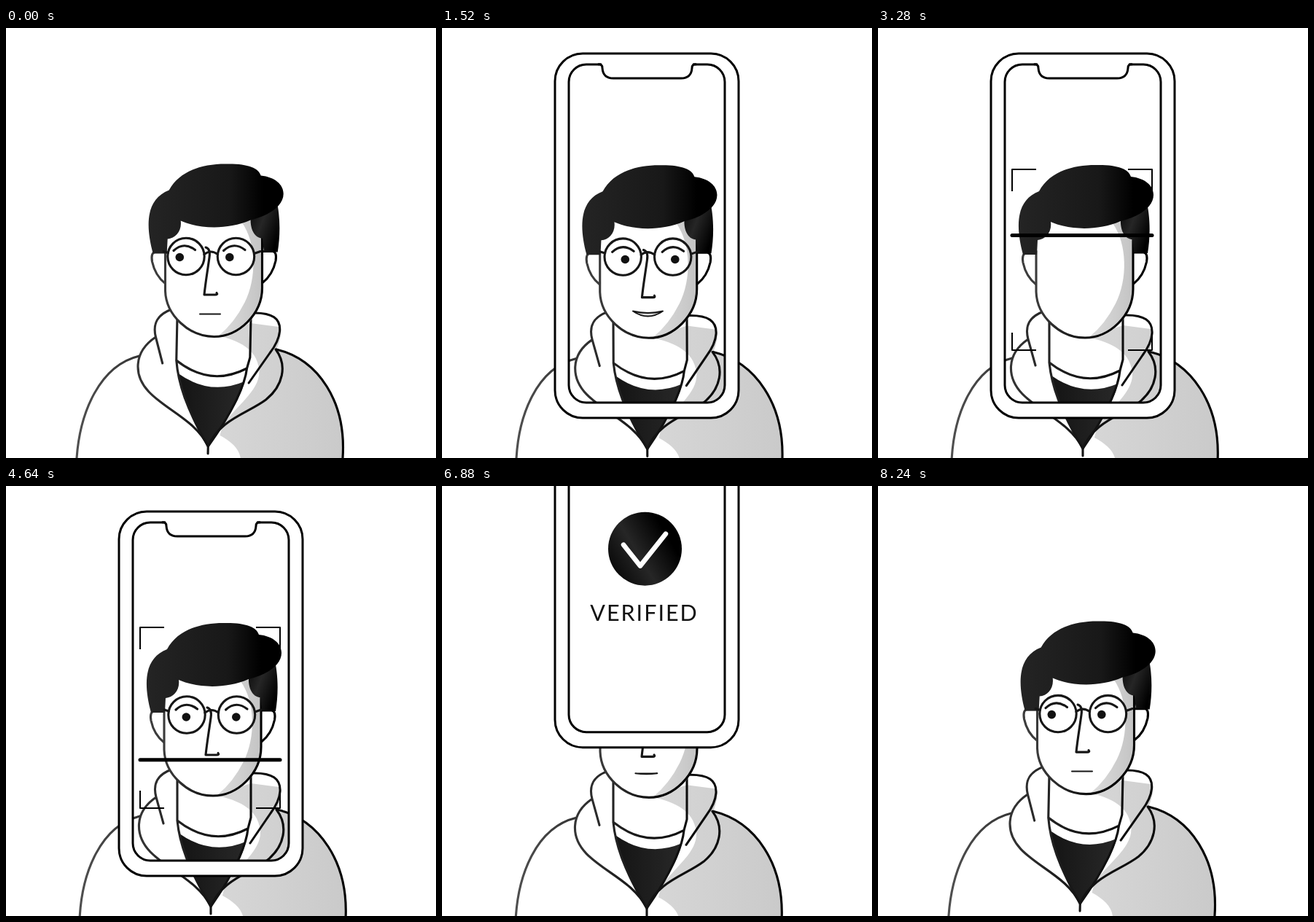
Animation, 590 px wide and 590 px high, one loop 8.32 s. Source, as an HTML page:

```html
<!DOCTYPE html>
<html lang="en">
<head>
<meta charset="utf-8">
<title>Face verification</title>
<style>
  html, body { margin: 0; width: 100%; height: 100%; overflow: hidden; background: #fff; }
  svg { display: block; width: 100vw; height: 100vh; }
  .ink { fill: none; stroke-width: 3.1; stroke-linecap: round; stroke-linejoin: round; }
  .label { font: 30.5px Lato, "Open Sans", sans-serif; letter-spacing: 2px; text-anchor: middle; fill: #111; }
</style>
</head>
<body>
<svg viewBox="0 0 590 590">
  <defs>
    <linearGradient id="bodyInk" gradientUnits="userSpaceOnUse" x1="100" x2="460">
      <stop stop-color="#505050"/><stop offset=".5" stop-color="#141414"/><stop offset="1"/>
    </linearGradient>
    <linearGradient id="headInk" gradientUnits="userSpaceOnUse" x1="196" x2="310">
      <stop stop-color="#484848"/><stop offset="1"/>
    </linearGradient>
    <linearGradient id="cloth" gradientUnits="userSpaceOnUse" x1="300" x2="466">
      <stop stop-color="#d6d6d6"/><stop offset="1" stop-color="#cacaca"/>
    </linearGradient>
    <linearGradient id="skin">
      <stop stop-color="#dcdcdc"/><stop offset="1" stop-color="#c4c4c4"/>
    </linearGradient>
    <linearGradient id="shirt">
      <stop stop-color="#141414"/><stop offset="1" stop-color="#282828"/>
    </linearGradient>
    <linearGradient id="hair">
      <stop stop-color="#242424"/><stop offset=".6" stop-color="#181818"/><stop offset=".85"/>
    </linearGradient>
    <linearGradient id="sideHair" x2="1" y2=".6">
      <stop stop-color="#0a0a0a"/><stop offset=".45" stop-color="#262626"/><stop offset="1"/>
    </linearGradient>
    <linearGradient id="badge" y1=".8" x2="1" y2=".2">
      <stop stop-color="#060606"/><stop offset=".4" stop-color="#262626"/><stop offset=".8"/>
    </linearGradient>
    <clipPath id="wipe"><rect id="wipeBox" width="590" height="590"/></clipPath>
  </defs>

  <g id="body">
    <path fill="url(#cloth)" d="M288 424C310 430 346 438 349 474C350 500 322 518 300 548L297 562C312 570 324 580 326 594H466C470 516 430 458 372 444C378 430 380 412 374 413L336 408Z"/>
    <path fill="url(#shirt)" d="M238 477Q282 508 329 488C325 508 310 536 281 577C256 535 243 504 238 477Z"/>
    <g class="ink" stroke="url(#bodyInk)">
      <path d="M101 594C104 530 130 466 184 453M372 444C430 458 470 516 466 594"/>
      <path d="M227 389C208 396 201 408 206 427L216 463M206 427C175 448 177 480 198 502C222 527 264 542 281 577V587"/>
      <path d="M337 394C366 393 377 402 376 419C375 432 369 441 363 449L335 490M371 444C388 466 382 494 359 513C334 532 296 540 281 577"/>
      <path d="M235 396V459C238 490 250 525 281 577M336 394V455L332 470C330 492 314 530 281 577M235 459Q282 496 332 470"/>
    </g>
  </g>

  <g id="face">
    <path id="ear" class="ink" style="color:#3c3c3c" stroke="currentColor" d="M217 309H203Q197 310 199 322C202 336 208 345 217 352"/>
    <path class="ink" stroke="#000" transform="translate(567.500 -1) scale(-1 1)" d="M217 309H203Q197 310 199 322C202 336 208 345 217 352"/>
    <path fill="#fff" d="M217 260V362C218 396 250 425 284 425C318 425 350 394 350 358V260Z"/>
    <path fill="url(#skin)" d="M322 268C342 296 343 345 326 378Q312 406 290 424C322 424 350 396 350 358V262Z"/>
    <path class="ink" stroke="url(#headInk)" d="M217 306V362C218 396 250 425 284 425C318 425 350 394 350 358V290"/>
  </g>

  <g id="hairGroup">
    <path fill="url(#sideHair)" d="M333 262C332 280 340 290 349 290L351 308L370 309C373 290 374 268 370 245Z"/>
    <path fill="url(#hair)" d="M199 311C188 270 190 236 221 224C236 196 270 187 303 188C330 188 344 194 347 204C366 206 378 216 378 229C378 247 355 260 333 265C300 279 262 277 237 266C239 280 230 290 219 291L218 311Z"/>
  </g>

  <g clip-path="url(#wipe)">
    <g class="ink" stroke="#161616">
      <g id="glasses"><path d="M273 311Q282 304 291.500 311M217 307L223.500 309M341.500 310L350 307"/></g>
      <g id="brows"></g>
      <path id="nose" d="M276 304Q283 306 281 318C278 340 276 350 274 369H289Q293 369 291 366.500"/>
      <path id="mouth" fill="#ddd" stroke-width="2"/>
    </g>
    <g id="eyes" fill="#111"></g>
  </g>

  <g id="corners" class="ink" stroke="#000" style="stroke-width:2;stroke-linecap:butt"></g>
  <path id="scan" d="M184 0H376" stroke="#000" stroke-width="5" stroke-linecap="round"/>

  <g id="phone">
    <path id="screen" fill="#fff" d="M174 50H388V514H174Z"/>
    <path id="bezel" fill="#fff" fill-rule="evenodd" stroke="#000" stroke-width="3"/>
    <path stroke="#fff" stroke-width="5" d="M219 50H344"/>
    <path fill="#fff" stroke="#000" stroke-width="3" d="M214 50Q220 49 220 55Q221 69 235 69H328Q342 69 343 55Q343 49 349 50"/>
    <g id="badgeGroup">
      <circle cx="278.500" cy="262.500" r="50.500" fill="url(#badge)"/>
      <path id="check" class="ink" style="stroke-width:6.5" d="M249 257L272 286L307 242" pathLength="100" stroke="#fff"/>
    </g>
    <text id="label" class="label" x="277.500" y="361">VERIFIED</text>
  </g>
</svg>

<script>
const LOOP = 8320, STEP = 80;
const el = Object.fromEntries([...document.querySelectorAll('[id]')].map(e => [e.id, e]));

function add(parent, tag, attrs) {
  const e = document.createElementNS('http://www.w3.org/2000/svg', tag);
  for (const name in attrs) e.setAttribute(name, attrs[name]);
  return parent.appendChild(e);
}

const roundRect = (x, y, w, h, r) => {
  const arc = (dx, dy) => `a${r} ${r} 0 0 1 ${dx} ${dy}`;
  return `M${x + r} ${y}h${w - 2 * r}${arc(r, r)}v${h - 2 * r}${arc(-r, r)}` +
    `h${2 * r - w}${arc(-r, -r)}v${2 * r - h}${arc(r, -r)}z`;
};
el.bezel.setAttribute('d', roundRect(155, 35, 252, 500, 38) + roundRect(174, 50, 214, 464, 24));

const eyes = [248, 316.5].map(x => {
  add(el.glasses, 'circle', { cx: x, cy: 314, r: 25.2 });
  add(el.brows, 'path', { d: `M${x - 15} 307q14 -13 29.500 -1` });
  return add(el.eyes, 'ellipse', { cx: x - .7, cy: 317, rx: 5.8 });
});

for (const sx of [-1, 1]) for (const sy of [-1, 1]) {
  const arm = sy < 0 ? 30 : 24;
  add(el.corners, 'path', { d: `M${280 + 96 * sx} ${318 + (124 - arm) * sy}v${arm * sy}h${-33 * sx}` });
}

const mix = (a, b, p) => a + (b - a) * p;
const move = (e, x, y) => e.setAttribute('transform', `translate(${x} ${y})`);

function drawMouth(smile) {
  const x1 = mix(266, 262, smile), x2 = mix(294, 303, smile);
  const y = mix(392.5, 388.5, smile), mid = (x1 + x2) / 2;
  el.mouth.setAttribute('d',
    `M${x1} ${y}Q${mid} ${y + 14 * smile} ${x2} ${y}Q${mid} ${y + 5 * smile} ${x1} ${y}`);
}

function draw(t) {
  const part = (a, b) => Math.min(1, Math.max(0, (t - a) / (b - a)));
  const ramp = (a, b) => (1 - Math.cos(Math.PI * part(a, b))) / 2;
  const bump = (a, b) => Math.sin(Math.PI * part(a, b));

  // The person faces the viewer, dips as the phone leaves, then looks away.
  const attend = ramp(440, 1240) - ramp(7680, 8200);
  const glance = bump(900, 2160);
  const look = 1 - attend - .2 * glance;
  const bob = 8 * (ramp(6720, 7160) - ramp(7600, 8160)) + bump(0, 480) - 1.3 * bump(8000, 8320);

  // The torso leans from the neck; head parts shift by depth.
  const lean = -.021 * look;
  el.body.setAttribute('transform', `matrix(1 0 ${lean} 1 ${-400 * lean} ${bob - 3 * look})`);
  const shift = (e, x, y) => move(e, x * look, y * look + bob);
  shift(el.face, 1.5, -1.5);
  shift(el.hairGroup, 2.7, -1.5);
  shift(el.glasses, -1, -.5);
  shift(el.brows, -3, -1.5);
  shift(el.nose, -2, -3);
  shift(el.mouth, 0, 0);
  move(el.eyes, 4 * glance - 9 * (1 - attend), bob - 2.5 * look);
  const open = 1 - ramp(7040, 7200) + ramp(7520, 7760);
  for (const eye of eyes) eye.setAttribute('ry', mix(1.3, 5.8, open));
  drawMouth(ramp(480, 1280) - .85 * ramp(6400, 6720) - .15 * ramp(7680, 8080));

  // The beam rises and wipes the features out, then falls and brings them back.
  const beam = mix(453, 233, ramp(2520, 3640) - ramp(3960, 5100));
  el.wipeBox.setAttribute('height', t >= 2520 && t < 4880 ? beam : 590);
  move(el.scan, 0, Math.min(beam, t < 4000 ? 453 : 416));
  el.scan.style.opacity = ramp(2400, 2600) - ramp(4800, 4960);
  el.corners.style.opacity = ramp(2200, 2560) - ramp(5080, 5440);

  move(el.phone, 0, 560 * (1 - ramp(400, 1280) - ramp(6660, 7240)));
  el.screen.style.opacity = ramp(5080, 5600);
  el.badgeGroup.setAttribute('transform',
    `translate(278.5 262.5) scale(${ramp(5320, 5760)}) translate(-278.5 -262.5)`);
  const drawn = 100 * (1 - (1 - part(5600, 6320)) ** 2);
  el.check.style.opacity = drawn > 0 ? 1 : 0;
  el.check.setAttribute('stroke-dasharray', `${drawn} 200`);
  el.label.style.opacity = ramp(5480, 6200);
}

const start = performance.now();
function tick() {
  const t = (performance.now() - start) % LOOP;
  draw(Math.floor(t / STEP) * STEP);
  requestAnimationFrame(tick);
}
tick();
</script>
</body>
</html>
```
